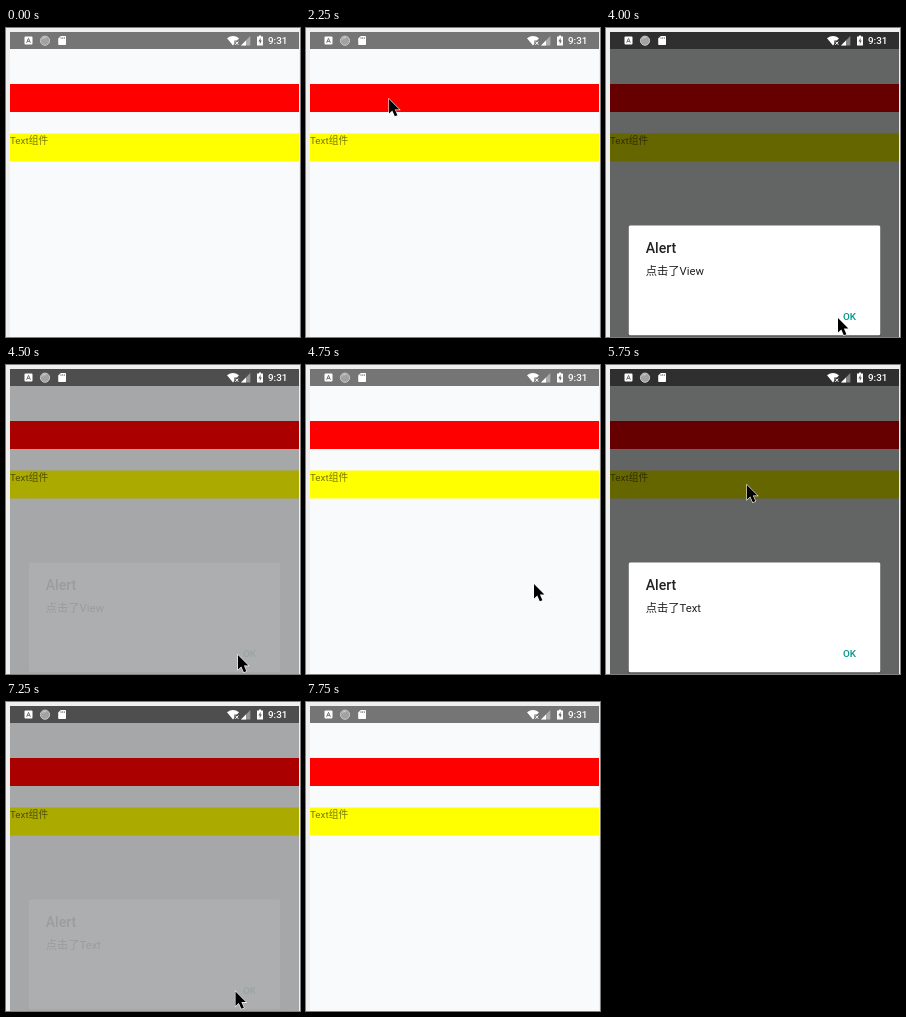
These frames come from a looping animation (294x309 px, 8.5 s). An HTML page:

```html
<!DOCTYPE html>
<html lang="zh">
<head>
<meta charset="utf-8">
<title>Alert demo</title>
<style>
  html, body { margin: 0; width: 100%; height: 100%; overflow: hidden; background: #eeefee; }
  svg { display: block; width: 100vw; height: 100vh; }
  text { font-family: Roboto, "Noto Sans CJK SC", "Noto Sans CJK", sans-serif; }
  .medium { font-weight: 500; }
</style>
</head>
<body>
<svg viewBox="0 0 294 309">
  <rect width="294" height="309" fill="#eeefee"/>
  <rect x="4" y="4" width="289" height="305" fill="#f9fafb"/>
  <rect x="4" y="4" width="289" height="17" fill="#757575"/>
  <rect id="view" x="4" y="56" width="289" height="28" fill="#f00"/>
  <g id="label">
    <rect x="4" y="105.5" width="289" height="28" fill="#ff0"/>
    <text x="4" y="115.7" font-size="9.8" fill="#000" fill-opacity=".54">Text组件</text>
  </g>
  <rect id="dim" x="4" y="4" width="289" height="305"/>

  <g id="status" fill="#fff">
    <rect x="18.5" y="8.5" width="8" height="8" rx="1"/>
    <path d="M20.6 14.8 22.5 10.3 24.4 14.8M21.2 13.4H23.8" fill="none" stroke="#666" stroke-width=".9"/>
    <circle cx="39" cy="12.7" r="4.6" fill="#a2a2a2" stroke="#c8c8c8"/>
    <path d="M36.2 11.2A3.2 3.2 0 0 1 40 9.7" fill="none" stroke="#ddd" stroke-width=".8"/>
    <path d="M54.8 8H59.2Q60 8 60 8.8V16.2Q60 17 59.2 17H53Q52.2 17 52.2 16.2V10.6Z"/>
    <path d="M55 9.2V11M56.7 9.2V11M58.4 9.2V11" stroke="#666" stroke-width=".7"/>
    <path d="M221 10.2Q227 5.6 233 10.2L231 12.5H228.3V16L227 17.4Z"/>
    <path d="M229.4 13.6 232.4 16.8M232.4 13.6 229.4 16.8" stroke="#fff" stroke-width="1"/>
    <path d="M244.3 8V17.4H235Z" opacity=".4"/>
    <path d="M240 12.4V17.4H235Z"/>
    <path d="M253 7.6H255V8.6H257V17.4H251V8.6H253Z"/>
    <path d="M254.6 9.8 252.4 13.4H253.8V16.2L255.8 12.6H254.6Z" fill="#666"/>
    <text class="medium" x="262" y="16.2" font-size="9.9">9:31</text>
  </g>

  <g id="alert">
    <rect x="22" y="198" width="253" height="110.3" rx="2" opacity=".2"/>
    <rect x="22.7" y="197.5" width="251.6" height="109.7" rx="1.5" fill="#fff"/>
    <text class="medium" x="39.7" y="225" font-size="14.1" fill="#212121">Alert</text>
    <text id="message" x="39.7" y="246.6" font-size="11.3" fill="#212121"></text>
    <text class="medium" x="237" y="291.7" font-size="9.9" fill="#009688">OK</text>
  </g>

  <path id="cursor" d="M0 0V14.6L3.3 11.6 5.8 17.3 8.4 16.2 5.9 10.6H10.4Z" stroke="#fff" stroke-width="1.1" paint-order="stroke"/>
</svg>
<script>
const LOOP = 8500;
const $ = id => document.getElementById(id);

// [dim opacity, dialog opacity]
const IDLE = [0, 0], OPEN = [0.6, 1], CLOSING = [0.333, 0.08];

// start ms, pointer x, pointer y (null = hidden), dialog phase, pressed part
const STEPS = [
  [0, null, null, IDLE],
  [750, 88, 24, IDLE],
  [1000, 83, 56.5, IDLE],
  [2250, 83, 71, IDLE],
  [2500, 83, 71, IDLE, "view"],
  [2750, 83, 71, OPEN],
  [3500, 247, 291, OPEN],
  [4000, 232, 290, OPEN],
  [4500, 232, 290, CLOSING],
  [4750, 228, 219, IDLE],
  [5000, 159, 87, IDLE],
  [5250, 141, 120, IDLE],
  [5500, 141, 120, IDLE, "label"],
  [5750, 141, 120, OPEN],
  [6000, 154.5, 142, OPEN],
  [6250, 260, 289.5, OPEN],
  [6500, 263, 291, OPEN],
  [6750, 232.5, 291, OPEN],
  [7000, 229.5, 289.5, OPEN],
  [7250, 229.5, 289.5, CLOSING],
  [7500, 228, 260, IDLE],
  [7750, null, null, IDLE]
];

function render(ms) {
  const t = ms % LOOP;
  const [, x, y, [dim, dialog], pressed] = STEPS.findLast(s => s[0] <= t);
  for (const id of ["view", "label"]) $(id).setAttribute("opacity", id === pressed ? 0.5 : 1);
  $("dim").setAttribute("opacity", dim);
  $("alert").setAttribute("opacity", dialog);
  $("message").textContent = t < 5000 ? "点击了View" : "点击了Text";
  $("cursor").setAttribute("visibility", x === null ? "hidden" : "visible");
  if (x !== null) $("cursor").setAttribute("transform", `translate(${x} ${y})`);
}

const start = performance.now();
function tick() {
  render(performance.now() - start);
  requestAnimationFrame(tick);
}
tick();
</script>
</body>
</html>
```
